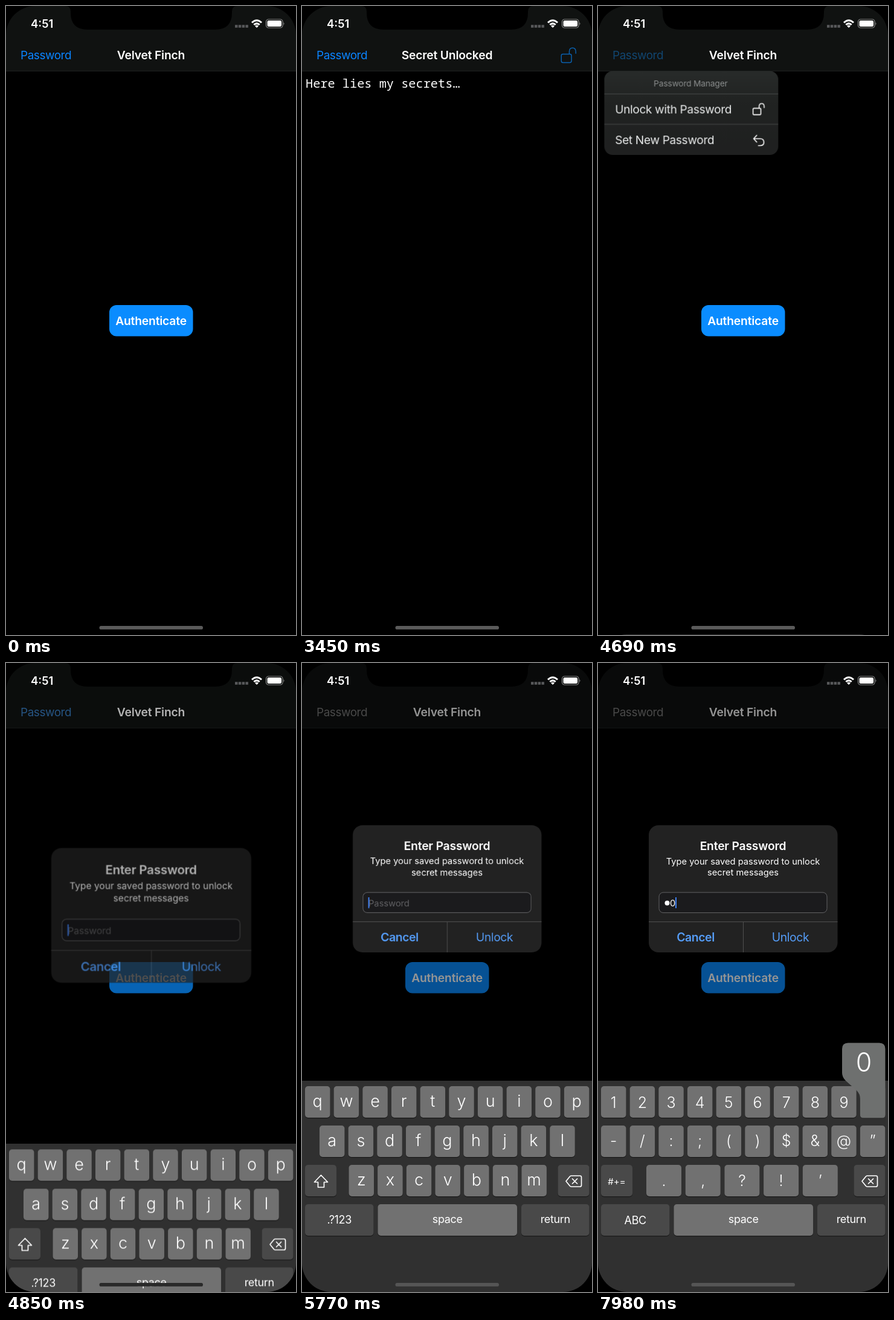
An HTML page for the animation above (8000 ms loop, 480 by 1039 pixels).

```html
<!DOCTYPE html>
<html lang="en">
<head>
<meta charset="utf-8">
<title>Password unlock</title>
<style>
  html, body { margin: 0; width: 100%; height: 100%; overflow: hidden; background: #000; }
  svg { display: block; width: 480px; height: 1039px; }
  text { font-family: Inter, "Open Sans", sans-serif; font-size: 19px; letter-spacing: -.025em; fill: #fff; }
  .mid { text-anchor: middle; }
  .bold { font-size: 19.3px; font-weight: 600; letter-spacing: -.01em; }
  .row { font-size: 19.3px; letter-spacing: -.02em; fill: #eef0f0; }
  .small { font-size: 14.7px; letter-spacing: 0; }
  .action { font-size: 19.4px; letter-spacing: -.022em; fill: #559df8; }
  .note { font-family: "Noto Sans Mono", "DejaVu Sans Mono", monospace; font-size: 20.3px; font-weight: 500; letter-spacing: 0; }
  .line { fill: none; stroke: #fff; stroke-width: 1.7; stroke-linecap: round; stroke-linejoin: round; }
  .caret { fill: #3f7ff0; }
  .key { fill: #717171; }
  .key.dark { fill: #494949; }
  .shade { fill: #1b1b1b; }
  .glyph { font-size: 27px; font-weight: 300; letter-spacing: 0; }
  .digit { font-size: 25px; font-weight: 300; letter-spacing: 0; }
  .word { font-size: 18px; letter-spacing: -.02em; }
  .tiny { font-size: 15px; letter-spacing: 0; }

  /* One 8 s clock for everything: 1% = 80 ms */
  [data-a] { animation: 8s linear infinite; }
  .step { animation-timing-function: step-end; }
  /* Critically damped spring, 1 - (1 + x)e^-x for x from 0 to 8 */
  .spring {
    animation-timing-function: linear(0, .09, .264, .442, .594, .713, .801, .864, .908, .939, .96, .973, .983, .989, .993, .997, 1);
  }

  .locked { animation-name: locked; }
  .unlocked { animation-name: unlocked; }
  .lock { animation-name: lock; }
  .link { animation-name: link; fill: #0a84ff; }
  .menu { animation-name: menu; transform-origin: 66px 107px; }
  .dim { animation-name: dim; }
  .alert { animation-name: alert; transform-origin: 240px 373px; }
  .keyboard { animation-name: keyboard; }
  .home { animation-name: home; }
  .letters { animation-name: letters; }
  .numbers { animation-name: numbers; }
  .popup { animation-name: popup; }
  .empty { animation-name: empty; }
  .one { animation-name: one; }
  .two { animation-name: two; }
  .blink { animation-name: blink; }

  @keyframes locked { 0%, 45.125% { visibility: visible } 43.125% { visibility: hidden } 100% { visibility: visible } }
  @keyframes unlocked { 0%, 45.125%, 100% { visibility: hidden } 43.125% { visibility: visible } }
  @keyframes lock {
    0%, 43.12% { opacity: 0 } 43.125%, 45.125% { opacity: 1 } 47.125%, 100% { opacity: 0 }
  }
  @keyframes link {
    0%, 50.4% { fill: #0a84ff } 52.5%, 58.625% { fill: #11456f }
    60.625% { fill: #3577b8 } 66%, 100% { fill: #7c7c7c }
  }
  @keyframes menu {
    0%, 50.5% { transform: scale(.3); opacity: 0; animation-timing-function: ease-out }
    53.1%, 58.625% { transform: none; opacity: 1; animation-timing-function: ease-out }
    60.7%, 100% { transform: scale(.3); opacity: 0 }
  }
  @keyframes dim { 0%, 58.625% { opacity: 0 } 65.2%, 100% { opacity: .42 } }
  @keyframes alert {
    0%, 58.625% { transform: translateY(146.5px) scale(1.2); opacity: 0 }
    65.2%, 100% { transform: translateY(0) scale(1); opacity: 1 }
  }
  @keyframes keyboard {
    0%, 58.625% { transform: translateY(349px) }
    65.2%, 100% { transform: translateY(0) }
  }
  @keyframes home { 0%, 59.5% { fill: #5b5b5b } 60.4%, 61.5% { fill: #292929 } 63%, 100% { fill: #555 } }
  @keyframes letters { 0% { visibility: visible } 75.5%, 100% { visibility: hidden } }
  @keyframes numbers { 0% { visibility: hidden } 75.5%, 100% { visibility: visible } }
  @keyframes popup { 0%, 89% { visibility: hidden } 86.25%, 96.375%, 100% { visibility: visible } }
  @keyframes empty { 0% { visibility: visible } 88.25%, 100% { visibility: hidden } }
  @keyframes one { 0%, 99.75%, 100% { visibility: hidden } 88.25% { visibility: visible } }
  @keyframes two { 0% { visibility: hidden } 99.75%, 100% { visibility: visible } }
  @keyframes blink { 0%, 75.5% { opacity: 1 } 78%, 80% { opacity: 0 } 82.25%, 100% { opacity: 1 } }
</style>
</head>
<body>
<svg viewBox="0 0 480 1039">
  <defs>
    <clipPath id="screen"><rect width="480" height="1039" rx="48"/></clipPath>
    <linearGradient id="menuFill" x2="0" y2="1">
      <stop stop-color="#292c2b"/><stop offset=".35" stop-color="#222423"/><stop offset="1" stop-color="#202121"/>
    </linearGradient>
    <path id="padlock" d="M3 9 H13 Q15 9 15 11 V18 Q15 20 13 20 H3 Q1 20 1 18 V11 Q1 9 3 9 Z M12 9 V6 Q12 1 16.500 1 Q21 1 21 6 V8"/>
  </defs>

  <g clip-path="url(#screen)">
    <rect width="480" height="1039"/>
    <rect width="480" height="107" fill="#101211"/>
    <rect y="107" width="480" height="1" fill="#1e2020"/>
    <text class="link" data-a x="24" y="88">Password</text>

    <g class="locked step" data-a>
      <text class="mid bold" x="240" y="88">Velvet Finch</text>
      <rect x="171" y="494" width="138.500" height="51.500" rx="12" fill="#0a8cff"/>
      <text class="mid bold" x="240" y="526.500">Authenticate</text>
    </g>
    <g class="unlocked step" data-a>
      <text class="mid bold" x="240" y="88">Secret Unlocked</text>
      <text class="note" x="6" y="135">Here lies my secrets…</text>
    </g>
    <g class="lock" data-a>
      <use href="#padlock" class="line" transform="translate(428 68) scale(1.2 1.27)" style="stroke:#0a62b2;stroke-width:1.2"/>
    </g>

    <g class="menu" data-a>
      <rect x="10" y="107.500" width="290" height="139.500" rx="14" fill="url(#menuFill)"/>
      <path d="M10 145.500H300M10 196H300" stroke="#484a4a"/>
      <text class="mid" x="154" y="133" style="font-size:13.800px;letter-spacing:-.01em;fill:#8d9090">Password Manager</text>
      <text class="row" x="28" y="178">Unlock with Password</text>
      <text class="row" x="28" y="229">Set New Password</text>
      <use href="#padlock" class="line" transform="translate(257 160.500) scale(.93 .98)"/>
      <path class="line" d="M264 214.500 L259 220 L264 225.500 M259 220 H270 Q276 220 276 226 Q276 231.500 270 231.500 H267"/>
    </g>

    <rect class="dim spring" data-a width="480" height="1039"/>

    <g class="alert spring" data-a>
      <rect x="84" y="268" width="312.500" height="210" rx="16" fill="#222"/>
      <text class="mid bold" x="240" y="309">Enter Password</text>
      <text class="mid small" x="240" y="332.500">Type your saved password to unlock</text>
      <text class="mid small" x="240" y="351">secret messages</text>
      <rect x="101" y="379" width="278" height="33.500" rx="7" fill="#1b1b1d" stroke="#626264"/>
      <path d="M84 427.500H396.500M240.500 427.500V478" stroke="#505050"/>
      <text class="mid bold action" x="161.500" y="460">Cancel</text>
      <text class="mid action" x="318.500" y="460">Unlock</text>
      <g class="empty step" data-a>
        <text class="small" x="110" y="402" style="fill:#606063">Password</text>
        <g class="blink" data-a><rect class="caret" x="109.500" y="387" width="2" height="18"/></g>
      </g>
      <g class="one step" data-a>
        <text class="small" x="110" y="402">0</text>
        <rect class="caret" x="119.500" y="387" width="2" height="18"/>
      </g>
      <g class="two step" data-a>
        <circle cx="114.500" cy="396.500" r="4" fill="#fff"/>
        <text class="small" x="119" y="402">0</text>
        <rect class="caret" x="128" y="387" width="2" height="18"/>
      </g>
    </g>

    <g class="keyboard spring" data-a>
      <rect y="690" width="480" height="349" fill="#303030"/>
      <g id="shared"></g>
      <g class="letters step" data-a id="letters"></g>
      <g class="numbers step" data-a id="numbers"></g>
      <path class="line" d="M450 847H460Q462.500 847 462.500 849.500V862.500Q462.500 865 460 865H446Q444.500 865 443.500 864L437 856L443.500 848Q444.500 847 446 847ZM447.500 852L455.500 860M455.500 852L447.500 860"/>
      <g class="popup step" data-a>
        <path fill="#6e706f" d="M414 627.500H465.500Q475.500 627.500 475.500 637.500V746.500Q475.500 751.500 470.500 751.500H439Q434 751.500 434 746.500V720Q434 712 428 706L410 690Q404 684 404 677V637.500Q404 627.500 414 627.500Z"/>
        <text class="mid" x="440" y="675" style="font-size:43px;font-weight:300;letter-spacing:0">0</text>
      </g>
    </g>

    <rect class="home" data-a x="154.500" y="1024" width="171.500" height="5.800" rx="2.900"/>
  </g>

  <path d="M98 0Q107 0 107 9V11Q107 39 135 39H346Q374 39 374 11V9Q374 0 383 0Z"/>
  <text class="bold" x="41" y="36" style="font-size:18.500px;letter-spacing:0">4:51</text>
  <path d="M379 33.500H401" stroke="#58595b" stroke-width="4.500" stroke-dasharray="4.500 1.300"/>
  <g fill="none" stroke="#fff" stroke-width="3">
    <path d="M407 27.500Q415 20 423 27.500M410.300 31Q415 26.800 419.700 31"/>
    <path d="M415 36L412 33Q415 30.500 418 33Z" fill="#fff" stroke="none"/>
  </g>
  <rect x="430.500" y="22" width="27.500" height="14" rx="4" fill="none" stroke="#8b8c8c" stroke-width="1.200"/>
  <rect x="432.500" y="24" width="23.500" height="10" rx="2.300" fill="#fff"/>
  <path d="M459.500 27Q461.500 29 459.500 31.500Z" fill="#8b8c8c"/>
</svg>

<script>
  const ROWS = [699, 764, 829, 894];
  const KEY_H = 52, PITCH = 47.65, KEY_W = 41.5;

  function el(parent, tag, attrs, text = "") {
    const node = document.createElementNS(parent.namespaceURI, tag);
    for (const name in attrs) node.setAttribute(name, attrs[name]);
    node.textContent = text;
    parent.append(node);
  }

  function key(parent, x, row, width, label = "", font = "glyph", base = 34, dark = false) {
    const box = { x, width, height: KEY_H, rx: 5 };
    el(parent, "rect", { ...box, y: ROWS[row] + 1.3, class: "shade" });
    el(parent, "rect", { ...box, y: ROWS[row], class: dark ? "key dark" : "key" });
    if (label) el(parent, "text", { x: x + width / 2, y: ROWS[row] + base, class: "mid " + font }, label);
  }

  function keys(parent, labels, x, row, font, base, width = KEY_W, pitch = PITCH) {
    [...labels].forEach((label, i) => key(parent, x + i * pitch, row, width, label, font, base));
  }

  const [shared, letters, numbers] =
    ["shared", "letters", "numbers"].map(id => document.getElementById(id));

  key(shared, 423.5, 2, 52, "", "", 0, true);
  key(shared, 125.5, 3, 230.5, "space", "word", 31);
  key(shared, 363, 3, 112.5, "return", "word", 31, true);

  keys(letters, "qwertyuiop", 5, 0, "glyph", 34);
  keys(letters, "asdfghjkl", 29, 1, "glyph", 34);
  keys(letters, "zxcvbnm", 77.5, 2, "glyph", 34);
  key(letters, 5, 2, 52, "", "", 0, true);
  key(letters, 5, 3, 113.5, ".?123", "word", 32, true);
  el(letters, "path", { class: "line", d: "M31.5 846L42.500 857.500H36.500V866H26.500V857.500H20.500Z" });

  keys(numbers, "1234567890", 5, 0, "digit", 36);
  keys(numbers, "-/:;()$&@”", 5, 1, "digit", 34);
  keys(numbers, ".,?!’", 80, 2, "digit", 35, 58, 64.7);
  key(numbers, 5, 2, 52, "#+=", "tiny", 33, true);
  key(numbers, 5, 3, 113.5, "ABC", "word", 33, true);
</script>
</body>
</html>
```
